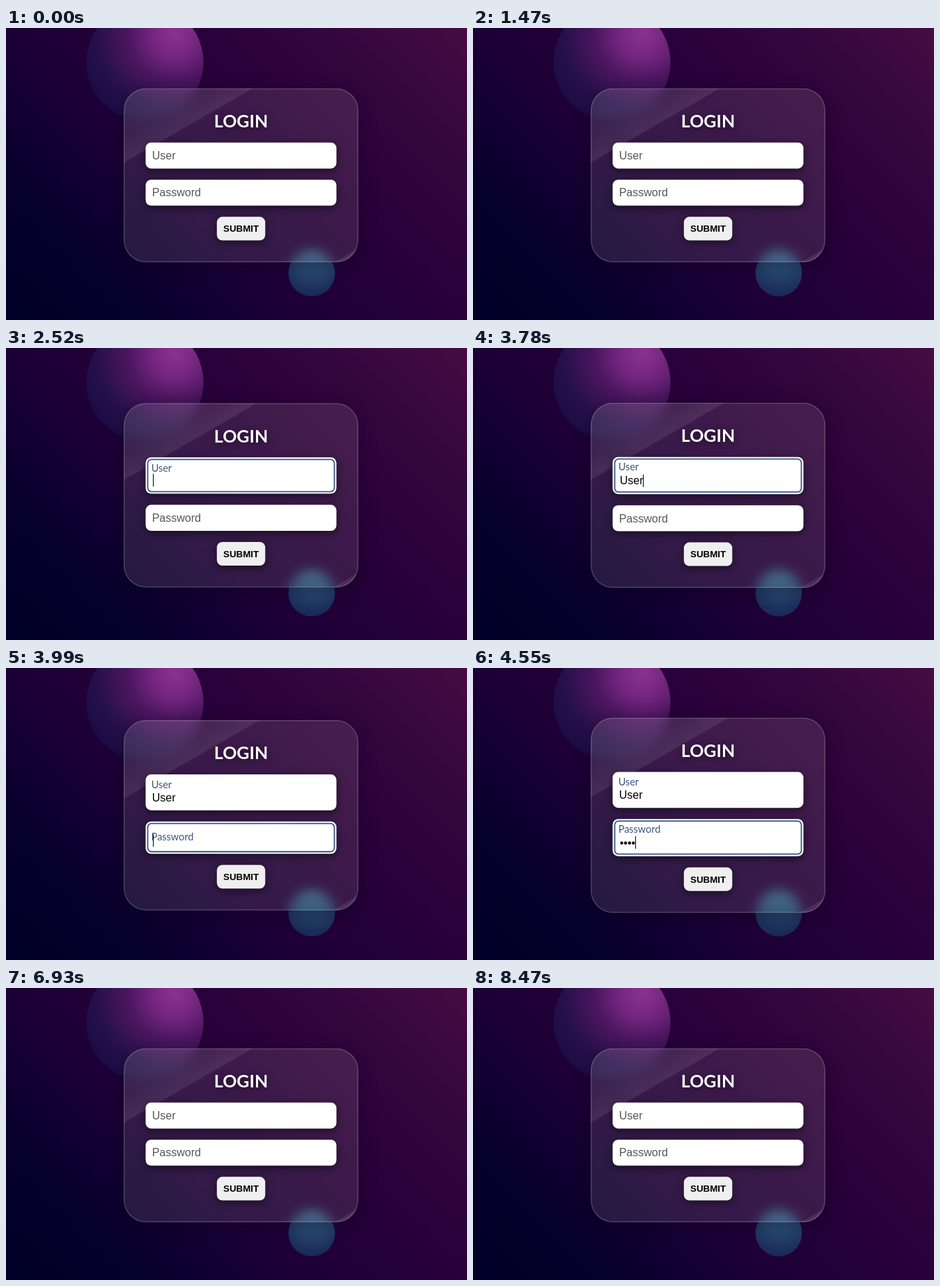
An HTML page with a canvas for the animation above (8.54 s loop, 662 px wide and 420 px high).

```html
<!DOCTYPE html>
<html lang="en">
<head>
<meta charset="utf-8">
<title>Login form</title>
<style>
html, body { margin: 0; width: 100%; height: 100%; overflow: hidden; background: #1c0036; }
canvas { display: block; }
</style>
</head>
<body>
<canvas id="stage" width="662" height="420"></canvas>
<script>
const W = 662, H = 420, LOOP = 8540, STEP = 70;
const ctx = document.getElementById('stage').getContext('2d');
const BLUE = '#3a5583';
const SANS = '"Liberation Sans", Arial, sans-serif';
const ROUND = 'Lato, "Open Sans", sans-serif';

// Timeline (ms)
const USER_FOCUS = 2130, PASS_FOCUS = 3810, SUBMIT_FOCUS = 5740, RESET = 6930;
const GROW = 600;
const USER_KEYS = [2940, 3150, 3290, 3570];
const PASS_KEYS = [4340, 4410, 4480, 4550, 4690, 4760, 4900, 4970, 5040, 5110, 5180, 5250];

// Layout
const CARD = { x: 169, w: 337, mid: 211.9, r: 32 };
const FIELD = { x: 200.5, w: 274, h: 37.4, grow: 14.2, focus: 1.9 };
const TOP = 78, GAP = 16, BTN_H = 34, BOTTOM = 31.5;

const clamp = v => Math.min(1, Math.max(0, v));

// CSS "ease": cubic-bezier(.25, .1, .25, 1)
function ease(x) {
  if (x <= 0 || x >= 1) return clamp(x);
  const bez = (s, a, b) => 3 * a * s * (1 - s) ** 2 + 3 * b * s * s * (1 - s) + s ** 3;
  let lo = 0, hi = 1;
  for (let i = 0; i < 20; i++) {
    const m = (lo + hi) / 2;
    if (bez(m, .25, .25) < x) lo = m; else hi = m;
  }
  return bez(lo, .1, 1);
}

function layer() {
  const c = document.createElement('canvas');
  c.width = W;
  c.height = H;
  return c;
}

function stops(g, list) {
  list.forEach(([at, color]) => g.addColorStop(at, color));
  return g;
}

function box(x, y, w, h, r) {
  ctx.beginPath();
  ctx.roundRect(x, y, w, h, r);
}

function shadow(color, blur, dy) {
  ctx.shadowColor = color;
  ctx.shadowBlur = blur;
  ctx.shadowOffsetY = dy;
}

function text(str, x, y, font, color) {
  ctx.font = font;
  ctx.fillStyle = color;
  ctx.fillText(str, x, y);
}

function ball(c, x, y, r, gx, gy, gr, list) {
  c.fillStyle = stops(c.createRadialGradient(gx, gy, 0, gx, gy, gr), list);
  c.beginPath();
  c.arc(x, y, r, 0, Math.PI * 2);
  c.fill();
}

function makeBackdrop() {
  const cv = layer(), c = cv.getContext('2d');
  c.fillStyle = stops(c.createLinearGradient(60.5, 480.5, 601.5, -60.5), [
    [0, '#000028'], [.18, '#05002c'], [.39, '#1c0036'],
    [.6, '#280039'], [.8, '#33063e'], [1, '#450c42']]);
  c.fillRect(0, 0, W, H);
  ball(c, 199.5, 49, 84, 243, 8, 150, [
    [0, '#8b3293'], [.22, '#74267f'], [.45, '#4c1660'], [.75, '#27104b'], [1, '#180c44']]);
  ball(c, 439, 352.5, 33.5, 441, 326, 64, [
    [0, '#30587f'], [.4, '#28496f'], [.8, '#1c2f5c'], [1, '#18234f']]);
  return cv;
}

function makeBlur(src) {
  const cv = layer(), c = cv.getContext('2d');
  c.filter = 'blur(8px)';
  c.drawImage(src, 0, 0);
  return cv;
}

const backdrop = makeBackdrop();
const blurred = makeBlur(backdrop);

function drawCard(y, h) {
  const { x, w, r } = CARD;
  ctx.save();
  // Outer shadow only
  ctx.beginPath();
  ctx.rect(0, 0, W, H);
  ctx.roundRect(x, y, w, h, r);
  ctx.clip('evenodd');
  shadow('rgba(10,0,25,.4)', 24, 4);
  box(x, y, w, h, r);
  ctx.fillStyle = '#000';
  ctx.fill();
  ctx.restore();

  ctx.save();
  box(x, y, w, h, r);
  ctx.clip();
  ctx.drawImage(blurred, 0, 0);
  ctx.fillStyle = 'rgba(225,230,205,.115)';
  ctx.fillRect(x, y, w, h);
  // Glass glints at 150deg
  const half = (w * .5 + h * .866) / 2, cx = x + w / 2, cy = y + h / 2;
  const dx = half * .5, dy = half * .866;
  ctx.fillStyle = stops(ctx.createLinearGradient(cx - dx, cy - dy, cx + dx, cy + dy), [
    [0, 'rgba(255,255,255,.02)'], [.15, 'rgba(255,255,255,.035)'],
    [.238, 'rgba(255,255,255,.085)'], [.243, 'rgba(255,255,255,0)'],
    [.952, 'rgba(255,255,255,0)'], [.957, 'rgba(255,255,255,.09)'],
    [1, 'rgba(255,255,255,.05)']]);
  ctx.fillRect(x, y, w, h);
  ctx.restore();

  box(x + .75, y + .75, w - 1.5, h - 1.5, r - .75);
  ctx.strokeStyle = 'rgba(255,255,255,.17)';
  ctx.lineWidth = 1.5;
  ctx.stroke();
}

function drawField(f, y, t) {
  const { x, w } = FIELD;
  ctx.save();
  shadow('rgba(0,0,0,.55)', 12, 3);
  box(x, y, w, f.h, 8);
  ctx.fillStyle = '#fff';
  ctx.fill();
  ctx.restore();

  if (f.focused) {
    box(x + 3, y + 3, w - 6, f.h - 6, 5.5);
    ctx.strokeStyle = BLUE;
    ctx.lineWidth = 1.8;
    ctx.stroke();
  }

  const tx = x + 9.2 + (f.focused ? 1 : 0);
  const mid = y + 18.7 + FIELD.grow * f.open + (f.focused ? 1 : 0);
  const font = '16px ' + SANS;
  if (!f.active) {
    text(f.label, tx, mid + 5.6, font, '#56565a');
    return;
  }
  text(f.label, x + 8.3, y + 35 - 15.3 * f.open, '14.4px ' + ROUND, BLUE);
  text(f.value, tx, mid + 5.6, font, '#000');
  if (f.focused && (t - f.touched) % 1000 < 500) {
    const cx = Math.round(tx + ctx.measureText(f.value).width);
    ctx.fillRect(cx, Math.round(mid - 9), 1, 18);
  }
}

function drawButton(y, k) {
  const x = 302.8, w = 69.5;
  const mix = (a, b) => Math.round(a + (b - a) * k);
  ctx.save();
  shadow('rgba(0,0,0,.5)', 12, 3);
  box(x, y, w, BTN_H, 8);
  ctx.fillStyle = `rgb(${mix(239, 63)},${mix(239, 91)},${mix(239, 131)})`;
  ctx.fill();
  ctx.restore();
  box(x + .6, y + .6, w - 1.2, BTN_H - 1.2, 7.4);
  ctx.strokeStyle = `rgba(255,255,255,${k})`;
  ctx.lineWidth = 1.2;
  ctx.stroke();
  const ink = mix(0, 255);
  ctx.textAlign = 'center';
  text('SUBMIT', x + w / 2, y + 21.8, 'bold 13.33px ' + SANS, `rgb(${ink},${ink},${ink})`);
  ctx.textAlign = 'left';
}

function field(label, t, from, to, keys, typed) {
  const active = t >= from && t < RESET;
  const focused = active && t < to;
  const open = active ? ease((t - from) / GROW) : 0;
  const done = active ? keys.filter(k => k <= t) : [];
  return {
    label, active, focused, open,
    value: typed(done.length),
    touched: done.length ? done[done.length - 1] : from,
    h: FIELD.h + FIELD.grow * open + (focused ? FIELD.focus : 0)
  };
}

function draw(t) {
  const user = field('User', t, USER_FOCUS, PASS_FOCUS, USER_KEYS, n => 'User'.slice(0, n));
  const pass = field('Password', t, PASS_FOCUS, SUBMIT_FOCUS, PASS_KEYS, n => '\u2022'.repeat(n));
  const k = t < RESET ? ease((t - SUBMIT_FOCUS + STEP) / 280) : 0;

  const h = TOP + user.h + GAP + pass.h + GAP + BTN_H + BOTTOM;
  const top = CARD.mid - h / 2;
  const userY = top + TOP, passY = userY + user.h + GAP, btnY = passY + pass.h + GAP;

  ctx.drawImage(backdrop, 0, 0);
  drawCard(top, h);
  ctx.save();
  shadow('rgba(0,0,0,.5)', 10, 2);
  ctx.textAlign = 'center';
  text('LOGIN', CARD.x + CARD.w / 2, top + 56.3, 'bold 25px ' + ROUND, '#fff');
  ctx.restore();
  drawField(user, userY, t);
  drawField(pass, passY, t);
  drawButton(btnY, k);
}

const start = performance.now();
function tick() {
  const t = (performance.now() - start) % LOOP;
  draw(Math.floor(t / STEP) * STEP);
  requestAnimationFrame(tick);
}
tick();
</script>
</body>
</html>
```
